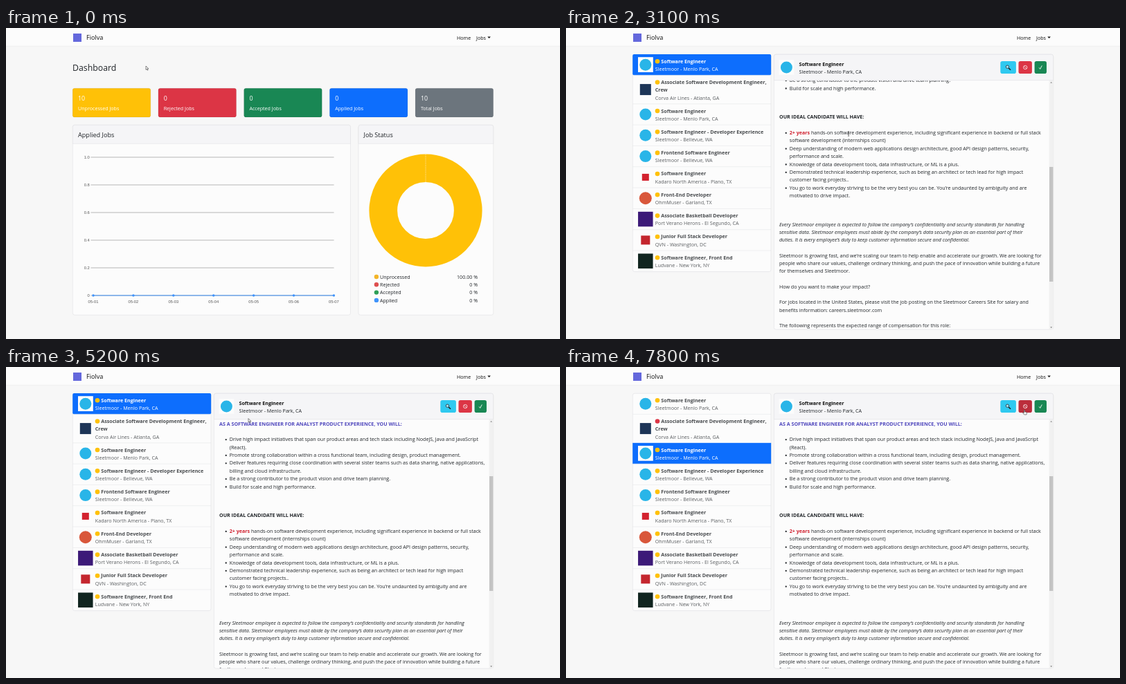
An HTML page that plays this animation: 800x450 px, repeating every 8000 ms.

```html
<!DOCTYPE html>
<html lang="en">
<head>
<meta charset="utf-8">
<title>Job board</title>
<style>
  html, body { margin: 0; width: 100%; height: 100%; overflow: hidden; background: #f7f7f7; }
  svg { display: block; font: 7.13px "Open Sans", "Noto Sans", sans-serif; fill: #212529; }
  .b { font-weight: 700; }
  .i { font-style: italic; }
  .hot { font-weight: 700; fill: #d0202f; }
  .head { font-weight: 700; fill: #4e46bd; }
  .axis { font: 5.8px "Liberation Sans", Arial, sans-serif; fill: #555; }
</style>
</head>
<body>
<svg id="stage" width="800" height="450" viewBox="0 0 800 450"></svg>
<script>
const LOOP = 8000, STEP = 100;
const YELLOW = '#ffc107', RED = '#dc3545', GREEN = '#198754', BLUE = '#0d6efd', GREY = '#6c757d';
const EDGE = '#dfe0e2', PAPER = '#fcfcfc', BAR = '#f5f5f7';

// y is the middle of the capitals
const text = (x, y, s, attr = '', size = 7.13) =>
  `<text x="${x}" y="${y + size * 0.365}" font-size="${size}" ${attr}>${s}</text>`;
const rect = (x, y, w, h, fill, attr = '') =>
  `<rect x="${x}" y="${y}" width="${w}" height="${h}" fill="${fill}" ${attr}/>`;
const dot = (x, y, r, fill, attr = '') => `<circle cx="${x}" cy="${y}" r="${r}" fill="${fill}" ${attr}/>`;
const line = (x1, y1, x2, y2, stroke, w = 0.6, attr = '') =>
  `<path d="M${x1} ${y1}L${x2} ${y2}" stroke="${stroke}" stroke-width="${w}" ${attr}/>`;
const bold = 'class="b"';

// ---- timeline -------------------------------------------------------
const CURSOR = [
  [0, 202, 55], [300, 260, 80], [900, 614, 106], [1000, 617, 108], [1400, 185, 95],
  [1800, 430, 140], [2700, 412, 150], [3100, 408, 153], [3700, 560, 90], [4100, 631, 58],
  [4700, 631, 58], [5200, 350, 74.5], [5600, 190, 86], [5900, 190, 86], [6700, 579, 56],
  [7000, 662, 62], [8000, 662, 62]
];
const SCROLL = [
  [0, 0], [1800, 0], [2700, 240], [4200, 240], [4500, 174], [4700, 154],
  [7299, 154], [7300, 0], [7600, 154], [8000, 154]
];
const smooth = k => k * k * (3 - 2 * k);
function sample(table, t, ease = k => k) {
  let i = 1;
  while (i < table.length - 1 && table[i][0] < t) i++;
  const a = table[i - 1], b = table[i];
  const k = ease(Math.min(1, (t - a[0]) / (b[0] - a[0])));
  return a.slice(1).map((v, j) => v + (b[j + 1] - v) * k);
}

// ---- shared ---------------------------------------------------------
function nav() {
  return rect(0, 0, 800, 450, '#f7f7f7') + rect(0, 0, 800, 26, PAPER) + line(0, 26.2, 800, 26.2, '#e8e8e8') +
    rect(97, 8, 12, 12, '#6468dc') +
    text(116, 14, 'Fiolva', 'fill="#111"', 9.1) +
    text(651, 14, 'Home', 'fill="#111"') + text(679, 14, 'Jobs', 'fill="#111"') +
    '<path d="M695.3 12.6h4.6l-2.3 2.4z" fill="#111"/>';
}
function panel(x, y, w, h, headH) {
  const frame = `stroke="${EDGE}" stroke-width=".6"`;
  return rect(x, y, w, h, PAPER, `rx="2.8" ${frame}`) +
    `<path d="M${x} ${y + headH}v${2.8 - headH}q0-2.8 2.8-2.8h${w - 5.6}q2.8 0 2.8 2.8v${headH - 2.8}z" fill="${BAR}" ${frame}/>`;
}

// ---- dashboard ------------------------------------------------------
const CARDS = [['10', 'Unprocessed Jobs', YELLOW], ['0', 'Rejected Jobs', RED],
  ['0', 'Accepted Jobs', GREEN], ['0', 'Applied Jobs', BLUE], ['10', 'Total Jobs', GREY]];
const LEGEND = [['Unprocessed', '100.00 %', '#f3b529'], ['Rejected', '0 %', '#de4f4f'],
  ['Accepted', '0 %', '#2e9f57'], ['Applied', '0 %', '#3f93fb']];

function dashboard() {
  let s = text(96, 58, 'Dashboard', '', 12.3);
  CARDS.forEach(([n, label, color], i) => {
    const x = 96.2 + i * 123.72;
    s += rect(x, 87.2, 112.6, 41.8, color, 'rx="2.8" stroke="#000" stroke-opacity=".14" stroke-width=".5"') +
      text(x + 7.8, 101.5, n, 'fill="#fff"', 8.9) + text(x + 7.8, 116.5, label, 'fill="#fff"');
  });
  s += panel(96.3, 140.3, 401.2, 275, 27) + text(104, 154.3, 'Applied Jobs', '', 9.1);
  s += panel(509, 140.3, 194.8, 275, 27) + text(516.5, 154.3, 'Job Status', '', 9.1);

  ['1.0', '0.8', '0.6', '0.4', '0.2', '0'].forEach((label, i) => {
    const y = 187 + i * 40;
    s += line(122.5, y, 473.5, y, '#adadad', 0.9) + text(120.8, y - 0.5, label, 'class="axis" text-anchor="end"');
  });
  s += line(126, 387, 473.5, 387, '#3f93fb', 1);
  for (let i = 0; i < 7; i++) {
    const x = 126 + i * 57.9;
    s += dot(x, 387, 1.7, '#3f93fb') + text(x, 395, '05-0' + (i + 1), 'class="axis" text-anchor="middle"');
  }

  s += dot(606, 264, 61.25, 'none', `stroke="${YELLOW}" stroke-width="81.5" style="stroke-width:40.7"`) +
    line(606, 182.5, 606, 223, '#fff', 0.5, 'stroke-dasharray="1.6 1"');
  LEGEND.forEach(([name, share, color], i) => {
    const y = 360 + i * 11.3;
    s += dot(534.9, y, 3.2, color) + text(540, y, name) + text(681, y, share, 'text-anchor="end"');
  });
  return s;
}

// ---- job list -------------------------------------------------------
const SKY = '#29b5e8', DEV = 'Sleetmoor - Menlo Park, CA';
// title, employer, mark colour, mark size, round
const JOBS = [
  ['Software Engineer', DEV, SKY, 17, 1],
  ['Associate Software Development Engineer, Crew', 'Corva Air Lines - Atlanta, GA', '#1d3557', 16, 0],
  ['Software Engineer', DEV, SKY, 17, 1],
  ['Software Engineer - Developer Experience', 'Sleetmoor - Bellevue, WA', SKY, 17, 1],
  ['Frontend Software Engineer', 'Sleetmoor - Bellevue, WA', SKY, 17, 1],
  ['Software Engineer', 'Kadaro North America - Plano, TX', '#d3222f', 10, 0],
  ['Front-End Developer', 'OhmMuser - Garland, TX', '#d9573b', 18, 1],
  ['Associate Basketball Developer', 'Port Verano Herons - El Segundo, CA', '#3c1a78', 21.5, 0],
  ['Junior Full Stack Developer', 'QVN - Washington, DC', '#c4262e', 13, 0],
  ['Software Engineer, Front End', 'Ludvane - New York, NY', '#10241f', 21.5, 0]
];
let top0 = 38;
const ROWS = JOBS.map((job, i) => {
  const row = { y: top0, h: i === 1 ? 41.5 : 30.32 };
  top0 += row.h;
  return row;
});
function mark(job, x, y) {
  const [, , color, size, round] = job;
  return round ? dot(x, y, size / 2, color) : rect(x - size / 2, y - size / 2, size, size, color);
}
function list(active, hover, rejected) {
  let s = rect(96.3, 38.2, 199.7, top0 - 38, PAPER, `rx="2.8" stroke="${EDGE}" stroke-width=".6"`);
  JOBS.forEach((job, i) => {
    const { y, h } = ROWS[i], on = i === active, over = i === hover;
    const main = on ? '#fff' : over ? '#000' : '#484b4e', sub = on ? '#fff' : over ? '#111' : '#5b5e61';
    if (on) s += rect(96.2, y, 200, h, BLUE, i ? '' : 'rx="2"') + rect(104, y + h / 2 - 11, 21.8, 21.8, PAPER);
    else if (over) s += rect(96.6, y, 199, h, '#f4f5f7');
    if (i && !on) s += line(96.3, y, 296, y, EDGE, 0.5);
    s += mark(job, 114.8, y + h / 2) +
      dot(132, y + 10.2, 3.3, i === 1 && rejected ? RED : YELLOW);
    const parts = i === 1 ? job[0].split(/ (?=Crew)/) : [job[0]];
    s += text(137.3, y + 10.1, parts[0], `${bold} fill="${main}"`);
    if (parts[1]) s += text(128.8, y + 21.4, parts[1], `${bold} fill="${main}"`);
    s += text(128.8, y + 10.1 + 11.3 * parts.length, job[1], `fill="${sub}"`);
  });
  return s;
}

// ---- job text -------------------------------------------------------
const para = (y, s, attr = '') =>
  s.split('\n').map((l, i) => text(308, y + i * 11.27, l, attr)).join('');
const bullets = (y, s, pitch = 11.4) => s.split('\n').map((l, i) => {
  const cy = y + i * pitch, first = l[0] === '*';
  return (first ? dot(317.7, cy + 0.5, 1.15, '#212529') : '') + text(322.8, cy, first ? l.slice(1) : l);
}).join('');
const hot = s => `<tspan class="hot">${s}</tspan>`;

const DATA_JOB = para(89.7, `Build the future of the OX Fact Vault. Join the Sleetmoor team.

Sleetmoor started with a clear vision: develop a cloud data platform that is effective, affordable, and accessible to all
data users. Sleetmoor developed an innovative new product with a built-for-the-cloud architecture that combines
the power of data warehousing, the flexibility of big data platforms, and the elasticity of the cloud at a fraction of the
cost of traditional solutions. We are now a global, world-class organization with offices in more than a dozen
countries and serving many more.

The Analyst Product Experience team (APEX) builds the experiences that serve the lion’s share of Sleetmoor users.
Our application allows users to author and run queries, view their results, create dashboards, analyze data, and
more. We are also building additional experiences for analysts. Come join the team building the most widely used
experiences for Sleetmoor.`.replace('fraction of the\ncost', 'fraction\nof the cost').replace('of the cost of', 'of the cost of')) +
  para(236, 'AS A SOFTWARE ENGINEER FOR ANALYST PRODUCT EXPERIENCE, YOU WILL:', 'class="head"') +
  bullets(258.6, `*Drive high impact initiatives that span our product areas and tech stack including NodeJS, Java and JavaScript
(React).
*Promote strong collaboration within a cross functional team, including design, product management.
*Deliver features requiring close coordination with several sister teams such as data sharing, native applications,
billing and cloud infrastructure.
*Be a strong contributor to the product vision and drive team planning.
*Build for scale and high performance.`) +
  para(368.6, 'OUR IDEAL CANDIDATE WILL HAVE:', bold) +
  bullets(391.4, `*${hot('2+ years')} hands-on software development experience, including significant experience in backend or full stack
software development (internships count)
*Deep understanding of modern web applications design architecture, good API design patterns, security,
performance and scale.
*Knowledge of data development tools, data infrastructure, or ML is a plus.
*Demonstrated technical leadership experience, such as being an architect or tech lead for high impact
customer facing projects..
*You go to work everyday striving to be the very best you can be. You’re undaunted by ambiguity and are
motivated to drive impact.`) +
  para(524.2, `Every Sleetmoor employee is expected to follow the company’s confidentiality and security standards for handling
sensitive data. Sleetmoor employees must abide by the company’s data security plan as an essential part of their
duties. It is every employee’s duty to keep customer information secure and confidential.`, 'class="i"') +
  para(569.2, `Sleetmoor is growing fast, and we’re scaling our team to help enable and accelerate our growth. We are looking for
people who share our values, challenge ordinary thinking, and push the pace of innovation while building a future
for themselves and Sleetmoor.

How do you want to make your impact?

For jobs located in the United States, please visit the job posting on the Sleetmoor Careers Site for salary and
benefits information: careers.sleetmoor.com

The following represents the expected range of compensation for this role:`);

const CREW_JOB = bullets(81, `*Business Resource Groups created to connect employees with common interests to promote inclusion, provide
perspective and help implement strategies
*Recognition rewards and awards through the platform Everbright Alongside
*Access to over 500 discounts, specialty savings and voluntary benefits through Corvaperks such as car and hotel
rentals and auto, home, and pet insurance, legal services, and childcare`, 11.5) +
  para(145.7, 'What You Need To Succeed (minimum Qualifications)', 'class="head"') +
  bullets(168.3, `*${hot('2 years')} of hands-on experience as a Software Engineer or related technical engineering capacity.
*Relevant technologies and programming languages including Java/J2EE framework, object-oriented
programming, design patterns and tools, relational DBs, Velora/UDB, Linux/Unix, Shell Scripting, KV SQL,
Portico OS, JQuery, AngularJS, Swagger and Springboot
*Knowledge of Agile Methodologies is required, while practical application is highly preferred.
*Working or formal training in the full Software Development Lifecycle, building CI/CD pipelines and practicing
Test Driven Development is required.
*Fundamental Awareness of Application Security principles or formal training in Information Security is required.
*Experience with source control, build tools and GIT (Codmor, Forgecask or other) is required.
*Consistently prioritizes safety and security of self, others, and personal data.
*Embraces diverse people, thinking, and styles.
*Possesses a high school diploma, GED, or high school equivalency.
*Is at least ${hot('18 years')} of age and has authorization to work in the United States.`, 11.48) +
  para(336.4, 'What Will Give You a Competitive Edge (preferred Qualifications)', bold) +
  bullets(358.7, `*Bachelor's Degree in Computer Science, Information Systems or related field.
*Technical Experience working with DevOps principles, practices, and tools in an enterprise technology
environment.
*Knowledge of software within an Nimbra Web Services (NWS) cloud infrastructure or other cloud solution`, 11.5) +
  para(423.6, '&lt; Go back');

// x, width, colour, hover colour, icon
const BUTTONS = [
  [627.3, 22.6, '#2fc9f0', '#27b9df',
    dot(637.4, 56.2, 2.2, '#a9e2f7', 'stroke="#2b3a45" stroke-width=".9"') + line(639.2, 58, 642, 60.8, '#1c1f22', 1.6)],
  [653.5, 19.4, RED, '#bb2d3b',
    dot(663.2, 57, 2.7, 'none', 'stroke="#f6dadd" stroke-width=".9"') + line(661.3, 55.1, 665.1, 58.9, '#f6dadd', 0.9)],
  [676.6, 17.4, GREEN, '#157347',
    '<path d="M683.2 57.4l1.5 2 2.6-5" fill="none" stroke="#fff" stroke-width=".9"/>']
];

function detail(active, scroll, hover) {
  const job = JOBS[active], crew = active === 1;
  const thumbY = crew ? 322 : 81 + scroll * 0.5, thumbH = crew ? 109 : 166;
  let s = panel(300.3, 38.2, 403.4, 398, 37.4) +
    rect(307.5, 46, 21.8, 21.8, PAPER) + mark(job, 318.4, 57) +
    text(336.5, 52, job[0], `${bold} fill="#111"`) + text(336.5, 63.2, job[1]);
  BUTTONS.forEach(([x, w, color, dark, icon], i) => {
    s += rect(x, 48, w, 18, i === hover ? dark : color, 'rx="2.8"') + icon;
  });
  return s + '<clipPath id="view"><rect x="301" y="76" width="396" height="360"/></clipPath>' +
    `<g clip-path="url(#view)"><g transform="translate(0 ${crew ? 0 : -scroll})">${crew ? CREW_JOB : DATA_JOB}</g></g>` +
    rect(697.6, 76, 5.8, 360, '#f1f1f1') + rect(698, thumbY, 5.4, thumbH, '#c4c4c4') +
    '<path d="M699.3 79.6h2.8l-1.4-1.7zM699.3 432.6h2.8l-1.4 1.7z" fill="#777"/>';
}

// ---- pointer --------------------------------------------------------
const POINTERS = {
  arrow: '<path d="M0 0v5.4l1.3-1.1 .9 1.9 .9-.4-.9-1.9h1.7z" fill="#fff" stroke="#222" stroke-width=".55"/>',
  hand: '<path d="M-.6.6q.6-1 1.2 0v2.2l2.4.7q.6.3.5 1l-.5 2.4h-3.4l-2-2.4q0-.9 1-.5l.8.6z" fill="#fff" stroke="#222" stroke-width=".55"/>',
  beam: '<path d="M-1.1-3.2h2.2M0-3.2v6.4M-1.1 3.2h2.2" fill="none" stroke="#222" stroke-width=".55"/>'
};

function frame(t) {
  const [x, y] = sample(CURSOR, t, smooth);
  const [scroll] = sample(SCROLL, t);
  let kind = 'arrow', body;
  if (t < 1100) {
    body = dashboard();
    if (y > 87 && y < 129 && (x - 96.2) % 123.72 < 112.6) kind = 'hand';
  } else {
    const active = t < 5800 ? 0 : t < 7300 ? 1 : 2;
    const row = x > 96 && x < 296 ? ROWS.findIndex(r => y >= r.y && y < r.y + r.h) : -1;
    const button = y > 48 && y < 66 ? BUTTONS.findIndex(b => x > b[0] && x < b[0] + b[1]) : -1;
    body = list(active, row, t >= 7200) + detail(active, scroll, button);
    if (row >= 0 || button >= 0) kind = 'hand';
    else if (x > 306 && x < 697 && y > 80) kind = 'beam';
  }
  return nav() + body + `<g transform="translate(${x} ${y})">${POINTERS[kind]}</g>`;
}

const stage = document.getElementById('stage');
let shown = -1;
function tick() {
  const t = Math.floor(performance.now() % LOOP / STEP) * STEP;
  if (t !== shown) stage.innerHTML = frame(shown = t);
  requestAnimationFrame(tick);
}
tick();
</script>
</body>
</html>
```
